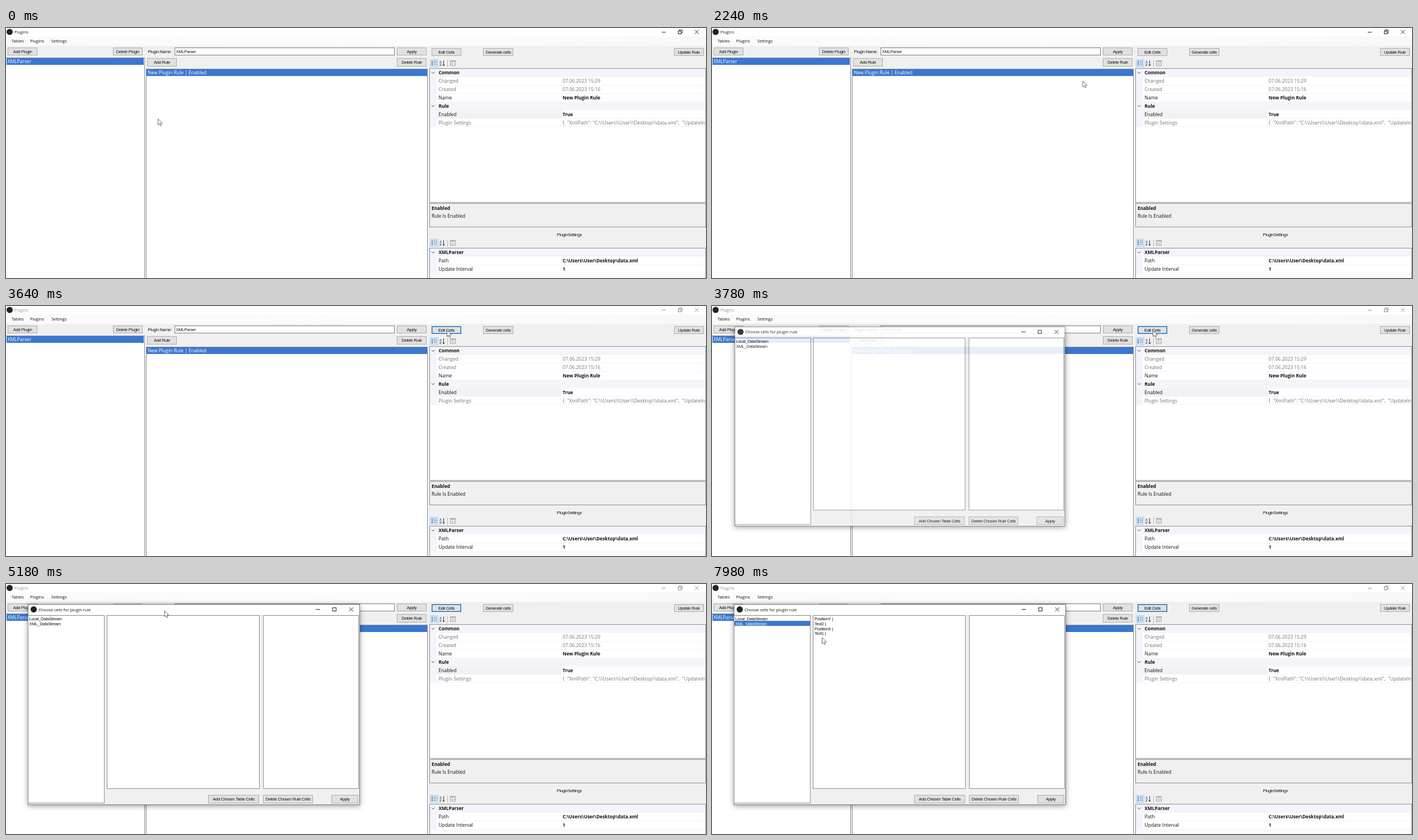
These frames come from a looping animation (1250 by 448 pixels, 8 s). An HTML page with a canvas:

```html
<!DOCTYPE html>
<html lang="en">
<head>
<meta charset="utf-8">
<title>Plugin rule editor</title>
<style>
  html, body { margin: 0; width: 100%; height: 100%; overflow: hidden; background: #f0f0f0; }
  canvas { display: block; width: 1250px; height: 448px; }
</style>
</head>
<body>
<canvas id="stage" width="1250" height="448"></canvas>
<script>
const stage = document.getElementById('stage');
const ctx = stage.getContext('2d');
const backdrop = document.createElement('canvas');
backdrop.width = stage.width;
backdrop.height = stage.height;
const backdropCtx = backdrop.getContext('2d');

const LOOP = 8000, STEP = 140;
const FACE = '#f0f0f0', BLUE = '#3a77d0', FOCUS = '#1f73c4', EDGE = '#8a8d92', GREY = '#747474';

const OPEN = '"Open Sans", "Noto Sans", sans-serif';
const FONTS = {
  control: { font: '7.6px "Liberation Sans", Arial, sans-serif', spacing: '-0.3px' },
  title: { font: `7.4px ${OPEN}`, spacing: '0px' },
  body: { font: `8.5px ${OPEN}`, spacing: '0px' },
  wide: { font: `8.8px ${OPEN}`, spacing: '0px' },
  bold: { font: `bold 8.3px ${OPEN}`, spacing: '0px' }
};

// Cursor tip over time: [ms, x, y, easing towards this point]
const linear = p => p;
const easeIn = p => p ** 1.4;
const easeOut = p => 1 - (1 - p) ** 1.7;
const smooth = p => p * p * (3 - 2 * p);
const PATH = [
  [0, 271.5, 163, linear], [980, 271.5, 163, linear], [2100, 662, 95, smooth],
  [2240, 662, 95, linear], [3220, 787.5, 44, smooth], [4200, 787.5, 44, linear],
  [5180, 283, 48, easeIn], [5320, 185, 53, linear], [5880, 53.5, 69, easeOut],
  [7140, 53.5, 69, linear], [7980, 196.5, 96, smooth]
];

function cursorAt(t) {
  const i = PATH.findIndex(k => k[0] >= t);
  if (i <= 0) return PATH[0].slice(1, 3);
  const [t0, x0, y0] = PATH[i - 1], [t1, x1, y1, ease] = PATH[i];
  const p = ease((t - t0) / (t1 - t0));
  return [x0 + (x1 - x0) * p, y0 + (y1 - y0) * p];
}

function rect(x, y, w, h, fill) {
  ctx.fillStyle = fill;
  ctx.fillRect(x, y, w, h);
}

function frame(x, y, w, h, fill, edge, line = 1) {
  rect(x, y, w, h, edge);
  rect(x + line, y + line, w - 2 * line, h - 2 * line, fill);
}

function text(str, x, y, style = 'body', color = '#111', align = 'left') {
  ctx.font = FONTS[style].font;
  ctx.letterSpacing = FONTS[style].spacing;
  ctx.textAlign = align;
  ctx.fillStyle = color;
  ctx.fillText(str, x, y + 2.9);
}

function stroke(points, color, width = 1) {
  ctx.beginPath();
  points.forEach(([x, y]) => ctx.lineTo(x, y));
  ctx.strokeStyle = color;
  ctx.lineWidth = width;
  ctx.stroke();
}

function disc(x, y, r) {
  ctx.beginPath();
  ctx.arc(x, y, r, 0, 7);
  ctx.fillStyle = '#20241f';
  ctx.fill();
}

function button(label, x, y, w, h = 14, fill = '#e1e1e1', edge = '#adadad', line = 1) {
  frame(x, y, w, h, fill, edge, line);
  text(label, x + w / 2, y + h / 2, 'control', '#111', 'center');
}

function closeMark(x, y, color) {
  stroke([[x - 3.5, y - 3.5], [x + 3.5, y + 3.5]], color);
  stroke([[x - 3.5, y + 3.5], [x + 3.5, y - 3.5]], color);
}

function box(x, y, w, h, color) {
  ctx.strokeStyle = color;
  ctx.lineWidth = 1;
  ctx.strokeRect(x, y, w, h);
}

function gridTools(y) {
  frame(757, y, 15, 14, '#cfe4f8', '#b4d3ee');
  for (let r = 0; r < 3; r++) {
    rect(760, y + 3 + r * 3, 2, 2, '#4779a8');
    rect(764, y + 3 + r * 3, 2, 1, '#777');
    rect(767, y + 3 + r * 3, 2, 1, '#777');
  }
  ctx.font = 'bold 6px "Liberation Sans", sans-serif';
  ctx.letterSpacing = '0px';
  ctx.textAlign = 'left';
  ctx.fillStyle = '#3467a4';
  ctx.fillText('A', 774, y + 6.5);
  ctx.fillStyle = '#444';
  ctx.fillText('Z', 774, y + 12);
  stroke([[781.5, y + 2], [781.5, y + 12]], '#333');
  stroke([[779.5, y + 9.5], [781.5, y + 12], [783.5, y + 9.5]], '#333');
  rect(788, y + 1, 1, 13, '#b5b5b5');
  frame(793, y + 2, 10, 10, '#ececec', '#aaa');
  rect(794, y + 3, 8, 2, '#bdbdbd');
  rect(797, y + 4, 1, 7, '#c4c4c4');
  rect(794, y + 8, 8, 1, '#c4c4c4');
}

// Rows are [label, value, style of value, color]; a row without a value is a heading.
function propertyGrid(y, h, rows, selected) {
  const pitch = 14.9, tint = '#f4f4fb';
  frame(756, y, 494, h, '#fff', EDGE);
  rect(757, y + 1, 12, rows.length * pitch, tint);
  rows.forEach(([label, value, style, color], i) => {
    const top = y + 1 + i * pitch, mid = top + 7.2;
    if (value === undefined) {
      rect(757, top, 492, pitch, tint);
      stroke([[760, mid - 1.5], [762.7, mid + 1.3], [765.4, mid - 1.5]], '#444');
      text(label, 772.5, mid, 'bold');
    } else {
      if (label === selected) rect(769, top, 222, pitch, '#f2f2f4');
      rect(769, Math.round(top + pitch) - 1, 480, 1, '#f3f3f9');
      rect(991, top, 1, pitch, '#f1f1f8');
      text(label, 772.5, mid, 'body', color);
      text(value, 994, mid, style, color);
    }
  });
}

function mainWindow(t) {
  const active = t < 3640;
  const ink = active ? '#222' : '#909090';
  rect(0, 0, 1250, 448, FACE);
  rect(0, 0, 1250, 15, '#fff');
  const bar = ctx.createLinearGradient(0, 0, 1250, 0);
  bar.addColorStop(0, '#fafafa');
  bar.addColorStop(.6, '#fcfcfc');
  bar.addColorStop(1, '#f8f8f8');
  rect(0, 15, 1250, 17, bar);
  disc(6.5, 7, 5.5);
  text('Plugins', 15, 7.5, 'title', ink);
  stroke([[1171, 7.5], [1178, 7.5]], ink);
  box(1200.5, 5.5, 5, 5, ink);
  stroke([[1202, 5], [1202, 3.5], [1207.5, 3.5], [1207.5, 9], [1206, 9]], ink);
  closeMark(1233.5, 7, ink);
  text('Tables', 10, 23.5, 'title');
  text('Plugins', 43, 23.5, 'title');
  text('Settings', 81, 23.5, 'title');

  button('Add Plugin', 3, 35, 53);
  button('Delete Plugin', 191, 35, 53);
  text('Plugin Name:', 253.5, 42, 'control');
  frame(301, 35, 393, 14, '#fff', '#7a7a7a');
  text('XMLParser', 303.5, 42, 'control');
  button('Apply', 698, 35, 53);
  button('Add Rule', 252, 54, 53, 15);
  button('Delete Rule', 698, 54, 53, 15);

  frame(-1, 53, 249, 400, '#fff', EDGE);
  rect(1, 54, 245, 12, BLUE);
  text('XMLParser', 2.5, 60, 'body', '#fff');
  frame(250, 73, 503, 380, '#fff', EDGE);
  rect(251, 74, 501, 12, BLUE);
  text('New Plugin Rule | Enabled', 253, 80, 'body', '#fff');

  const hover = t >= 3220 && active;
  if (!active) button('Edit Cells', 760, 36, 53, 14, '#e1e1e1', FOCUS, 1.5);
  else if (hover) button('Edit Cells', 760, 36, 53, 14, '#dcebf9', '#3f83c6');
  else button('Edit Cells', 760, 36, 53);
  button('Generate cells', 852, 36, 54);
  button('Update Rule', 1193, 36, 53);

  gridTools(56);
  propertyGrid(72, 241, [
    ['Common'],
    ['Changed', '07.06.2023 15:29', 'body', GREY],
    ['Created', '07.06.2023 15:16', 'body', GREY],
    ['Name', 'New Plugin Rule', 'bold'],
    ['Rule'],
    ['Enabled', 'True', 'bold'],
    ['Plugin Settings', '{  "XmlPath": "C:\\\\Users\\\\User\\\\Desktop\\\\data.xml",  "UpdateInterval": 1 }', 'wide', GREY]
  ], 'Enabled');
  rect(1249, 72, 1, 241, EDGE);
  frame(756, 314, 494, 43, FACE, EDGE);
  text('Enabled', 760, 323, 'bold');
  text('Rule Is Enabled', 760, 337.5);
  text('PluginSettings', 1006, 370, 'control', '#111', 'center');
  gridTools(378);
  propertyGrid(394, 60, [
    ['XMLParser'],
    ['Path', 'C:\\Users\\User\\Desktop\\data.xml', 'bold'],
    ['Update Interval', '1', 'bold']
  ]);
  rect(757, 440, 492, 8, '#fafafc');
}

function dialog(t) {
  ctx.save();
  if (t < 3920) {
    ctx.translate(335.5, 215.5);
    ctx.scale(.995, .995);
    ctx.translate(-335.5, -215.5);
  }
  ctx.save();
  ctx.shadowColor = 'rgba(0,0,0,.38)';
  ctx.shadowBlur = 9;
  ctx.shadowOffsetY = 2;
  rect(39, 36, 593, 360, '#777');
  ctx.restore();
  rect(40, 37, 591, 358, FACE);
  rect(40, 37, 591, 18, '#fff');
  disc(49.5, 45.5, 5.5);
  text('Choose cells for plugin rule', 58, 45.7, 'title');
  stroke([[553, 45.5], [561, 45.5]], '#222');
  box(583.5, 42.5, 6, 6, '#222');
  closeMark(616.5, 45.5, '#222');

  frame(39, 56, 137, 337, '#fff', EDGE);
  frame(180, 56, 273, 311, '#fff', EDGE);
  frame(459, 56, 171, 311, '#fff', EDGE);
  const selected = t >= 6160;
  if (selected) rect(40, 66, 135, 9, BLUE);
  text('Local_DataStream', 41.5, 62, 'control');
  text('XML_DataStream', 41.5, 71, 'control', selected ? '#fff' : '#111');
  if (t >= 6300) {
    ['PositionY |', 'Text2 |', 'PositionX |', 'Text1 |']
      .forEach((label, i) => text(label, 183, 62 + i * 8.85, 'control'));
  }
  button('Add Chosen Table Cells', 361, 378, 91, 15);
  button('Delete Chosen Rule Cells', 459, 378, 89, 15);
  button('Apply', 581, 378, 48, 15);
  ctx.restore();
}

// While opening, the window underneath shines faintly through the dialog.
function openingDialog(t) {
  backdropCtx.drawImage(stage, 0, 0);
  dialog(t);
  ctx.globalAlpha = .12;
  ctx.drawImage(backdrop, 40, 36, 591, 359, 40, 36, 591, 359);
  ctx.globalAlpha = 1;
}

function cursor(x, y) {
  const shape = [[0, 0], [0, 10.8], [2.5, 8.6], [4.2, 12.4], [6, 11.6], [4.4, 7.9], [7.8, 7.6]];
  ctx.beginPath();
  shape.forEach(([dx, dy]) => ctx.lineTo(x + dx, y + dy));
  ctx.closePath();
  ctx.fillStyle = '#fff';
  ctx.fill();
  ctx.strokeStyle = '#444';
  ctx.lineWidth = .8;
  ctx.stroke();
}

function draw(now) {
  const t = Math.floor((now % LOOP) / STEP) * STEP;
  mainWindow(t);
  if (t >= 3920) dialog(t);
  else if (t >= 3780) openingDialog(t);
  cursor(...cursorAt(t));
}

const start = performance.now();
function tick() {
  draw(performance.now() - start);
  requestAnimationFrame(tick);
}
tick();
</script>
</body>
</html>
```
